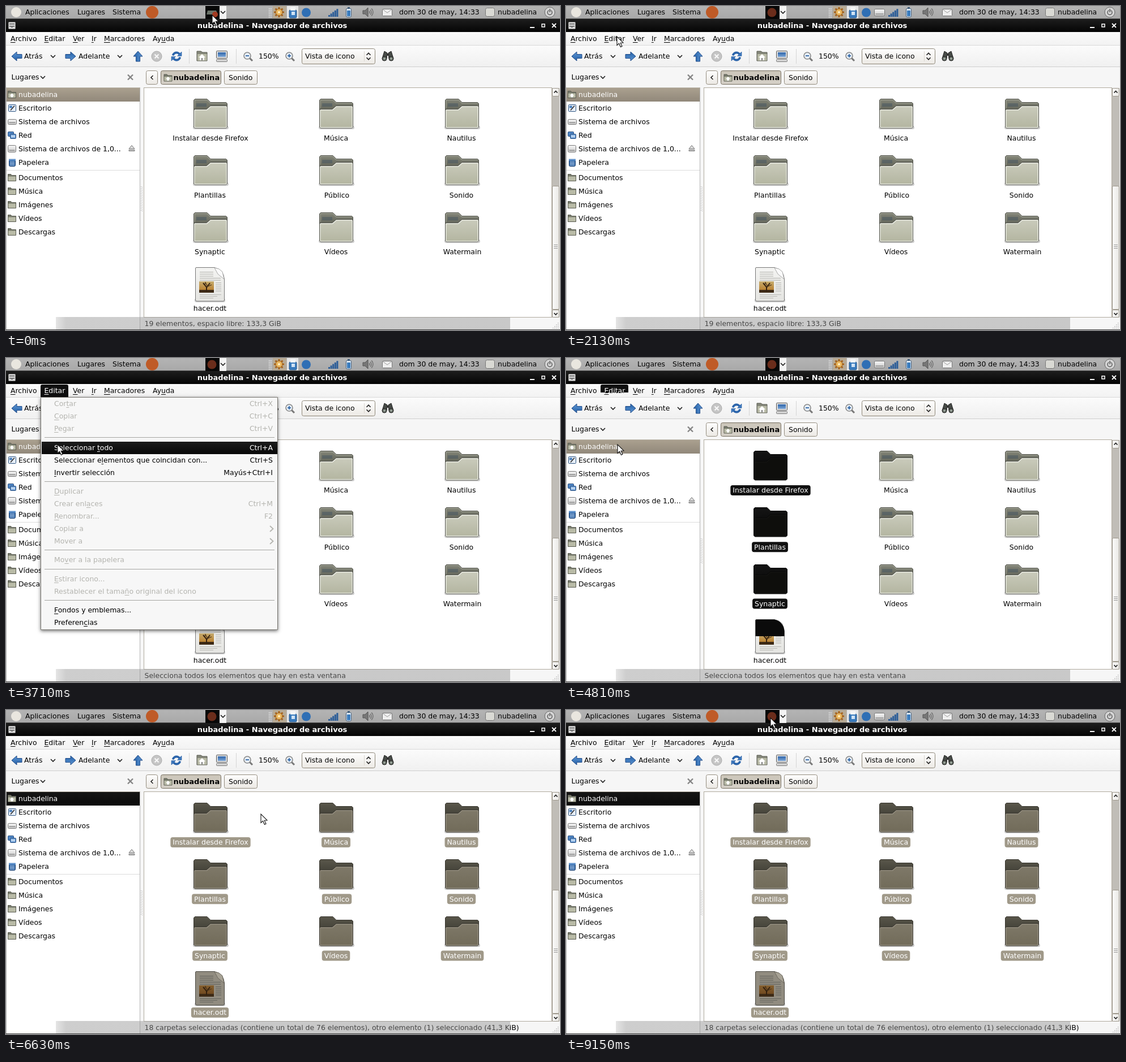
Animation, 978 px wide and 573 px high, one loop 9220 ms. Source, as an HTML page with a canvas:

```html
<!DOCTYPE html>
<html lang="es">
<head>
<meta charset="utf-8">
<title>Navegador de archivos</title>
<style>
html, body { margin: 0; width: 100%; height: 100%; overflow: hidden; background: #f6f6f6; }
canvas { display: block; }
</style>
</head>
<body>
<canvas id="stage" width="978" height="573"></canvas>
<script>
const ctx = document.getElementById('stage').getContext('2d');
const LOOP = 9220, USER = 'nubadelina';
const FONT = '12.45px "DejaVu Sans", sans-serif', BOLD = 'bold 13px "DejaVu Sans", sans-serif';

// Pointer stops: time, x, y
const PATH = [[0, 364, 16], [180, 364, 16], [500, 345, 70], [800, 275, 115], [1110, 207, 118],
  [1450, 130, 95], [1810, 90, 54], [2780, 90, 54], [3060, 88, 102], [3400, 91, 138], [3710, 91, 153],
  [4810, 91, 153], [5090, 122, 157], [5360, 182, 166], [5750, 295, 222], [6050, 380, 214],
  [6390, 450, 184], [7630, 450, 184], [8100, 408, 110], [8570, 363, 29], [8790, 361, 14], [9220, 361, 14]];
// The drive light flips at each of these times
const BLINKS = [180, 620, 1130, 1630, 2130, 2620, 3120, 3620, 4110, 4630, 4810, 5620, 6130, 6630, 7150, 7630, 8150, 8650, 9150];
const OPEN = 2250, CLOSE = 4810, ALL = 4870, BLUR = 4930;

const LOOKS = {
  plain: { edge: '#50514a', back: ['#85877a', '#5c5e53'], front: ['#cacbbc', '#b3b5a0'], shine: '#eeefe8' },
  black: { edge: '#080808', back: ['#151515', '#0c0c0c'], front: ['#0e0e0c', '#0e0e0c'], shine: '#141412' },
  tan: { edge: '#36342d', back: ['#5b584c', '#403f36'], front: ['#7f7969', '#716b59'], shine: '#948e80' }
};

const FILES = [['Instalar desde Firefox', 361, 0, 0], ['Música', 582.5, 1, 0], ['Nautilus', 804, 2, 0],
  ['Plantillas', 360, 0, 1], ['Público', 584, 1, 1], ['Sonido', 804, 2, 1],
  ['Synaptic', 360, 0, 2], ['Vídeos', 582.5, 1, 2], ['Watermain', 805.5, 2, 2]];

const PLACES = [[USER, 156.5], ['Escritorio', 180.5], ['Sistema de archivos', 204.5], ['Red', 228.5],
  ['Sistema de archivos de 1,0...', 252.5], ['Papelera', 276.5], ['Documentos', 303.5], ['Música', 327.5],
  ['Imágenes', 351.5], ['Vídeos', 375.5], ['Descargas', 399.5]];

const MENU = [['Cor_tar', 81, 'Ctrl+X'], ['_Copiar', 103, 'Ctrl+C'], ['_Pegar', 125, 'Ctrl+V'],
  ['Seleccionar _todo', 158.5, 'Ctrl+A', 1], ['Seleccionar e_lementos que coincidan con...', 180.5, 'Ctrl+S', 1],
  ['_Invertir selección', 202.5, 'Mayús+Ctrl+I', 1], ['_Duplicar', 236, ''], ['Crear enl_aces', 258, 'Ctrl+M'],
  ['_Renombrar...', 280, 'F2'], ['Copiar a', 302, '>'], ['Mover a', 324, '>'], ['Mo_ver a la papelera', 357, ''],
  ['_Estirar icono...', 390.5, ''], ['Restablecer el tama_ño original del icono', 412.5, ''],
  ['_Fondos y emblemas...', 446, '', 1], ['Preferen_cias', 468, '', 1]];

function vgrad(y0, y1, a, b) {
  const g = ctx.createLinearGradient(0, y0, 0, y1);
  g.addColorStop(0, a); g.addColorStop(1, b);
  return g;
}
function rect(x, y, w, h, fill) { ctx.fillStyle = fill; ctx.fillRect(x, y, w, h); }
function box(x, y, w, h, r, fill, stroke) {
  ctx.beginPath(); ctx.roundRect(x, y, w, h, r);
  paint(fill, stroke);
}
function paint(fill, stroke, width = 1) {
  if (fill) { ctx.fillStyle = fill; ctx.fill(); }
  if (stroke) { ctx.strokeStyle = stroke; ctx.lineWidth = width; ctx.stroke(); }
}
function disc(x, y, r, fill, stroke, width) {
  ctx.beginPath(); ctx.arc(x, y, r, 0, 7); paint(fill, stroke, width);
}
function poly(pts, fill, stroke, width) {
  ctx.beginPath();
  for (let i = 0; i < pts.length; i += 2) ctx.lineTo(pts[i], pts[i + 1]);
  ctx.closePath(); paint(fill, stroke, width);
}
function line(pts, color, width = 1) {
  ctx.beginPath();
  for (let i = 0; i < pts.length; i += 2) ctx.lineTo(pts[i], pts[i + 1]);
  paint(null, color, width);
}
// Centred on y; an underscore marks the mnemonic letter
function text(str, x, y, color = '#000', align = 'left', font = FONT) {
  const at = str.indexOf('_'), s = str.replace('_', '');
  ctx.font = font; ctx.fillStyle = color; ctx.textAlign = align;
  ctx.fillText(s, x, Math.round(y + 4.4));
  if (at >= 0) {
    const x0 = x + ctx.measureText(s.slice(0, at)).width;
    ctx.fillRect(x0, Math.round(y + 6), ctx.measureText(s[at]).width, 1);
  }
}
function chevron(x, y, color = '#222', dx = 4, dy = 4) {
  line([x - dx, y - dy / 2, x, y + dy / 2, x + dx, y - dy / 2], color, 1.7);
}
function at(x, y, turn, draw) {
  ctx.save(); ctx.translate(x, y); ctx.rotate(turn); draw(); ctx.restore();
}
function arrow(x, y, turn) {
  at(x, y, turn, () => poly([-9, 0, 0, -8, 0, -3.5, 9, -3.5, 9, 3.5, 0, 3.5, 0, 8], vgrad(-8, 8, '#5c95d4', '#2561a6'), '#204a87'));
}

function folder(x, y, look) {
  at(x, y, 0, () => {
    if (look !== LOOKS.black) box(-1, 49, 63, 6, 3, 'rgba(0,0,0,.2)');
    poly([.5, 3.5, 2.5, 1.5, 24, 1.5, 30, 7.5, 57.5, 7.5, 59.5, 9.5, 59.5, 50, .5, 50], vgrad(0, 26, ...look.back), look.edge);
    if (look === LOOKS.plain) {
      line([2, 18, 2, 4, 3, 3, 23.5, 3, 29.5, 9, 58, 9], '#a5a799');
      rect(5, 9, 18, 6, 'rgba(58,78,96,.4)');
    }
    poly([.5, 21, 2.5, 19.5, 23, 19.5, 30, 13.5, 57.5, 13.5, 59.5, 15, 59.5, 51, 57.5, 53, 2.5, 53, .5, 51], vgrad(13, 53, ...look.front), look.edge);
    poly([1.8, 21.5, 3, 20.8, 23.6, 20.8, 30.5, 14.9, 57, 14.9, 58.2, 15.6, 58.2, 51, 57, 51.8, 3, 51.8, 1.8, 51], null, look.shine, 1.2);
  });
}
function sheet(x, y, sel, half) {
  at(x, y, 0, () => {
    const shape = new Path2D('M2 .5H34Q50 4 51.5 21V58Q51.5 60 49 60H3Q.5 60 .5 58V2Q.5 .5 2 .5Z');
    box(-1, 55, 54, 7, 3, 'rgba(0,0,0,.2)');
    ctx.fillStyle = sel ? '#918c80' : vgrad(0, 60, '#f4f4f2', '#e4e4e1'); ctx.fill(shape);
    const ink = sel ? '#66665f' : '#b9b9b5';
    for (let i = 0; i < 5; i++) rect(8, 8 + i * 3.6, i < 3 ? 24 : 37, 1.2, ink);
    for (let i = 0; i < 5; i++) rect(36, 27 + i * 3.6, 10, 1.2, ink);
    for (let i = 0; i < 3; i++) rect(8, 48 + i * 3, 38 - i * 7, 1, ink);
    rect(7, 25, 26, 20, vgrad(25, 45, sel ? '#85602f' : '#c7ac6e', sel ? '#6b431c' : '#b5741f'));
    rect(7, 40, 26, 5, '#3d2a16');
    line([20, 42, 20, 35, 14, 28], '#33200f', 2); line([20, 36, 26, 28], '#33200f', 2);
    line([17, 32, 18, 27, 22, 34, 29, 31], '#4b341b', 1.2);
    ctx.strokeStyle = sel ? '#4b4942' : '#777'; ctx.lineWidth = 1; ctx.stroke(shape);
    poly([34, 1, 40, 12, 51, 21, 48, 8, 42, 3], sel ? '#a7a295' : '#fafafa', sel ? '#6d695f' : '#aaa');
    if (half) { ctx.clip(shape); rect(-1, 0, 54, 30, '#0b0b0b'); }
  });
}
function miniFolder(x, y, home) {
  poly([x, y, x + 5, y, x + 7, y + 2, x + 14, y + 2, x + 14, y + 12, x, y + 12], '#777a6c', '#5a5c52');
  rect(x + .5, y + 4, 13, 7.5, '#b9bba7');
  if (home) { poly([x + 7, y + 4, x + 11, y + 8, x + 3, y + 8], '#fff'); rect(x + 5, y + 7, 4, 4, '#fff'); }
}
function drive(x, y, w, h) {
  box(x, y, w, h, 2, vgrad(y, y + h, '#f7f7f7', '#c9c9c9'), '#777');
  rect(x + 2, y + h - 4, w - 4, 1.5, '#8c8c8c');
}

function panel(t) {
  rect(0, 0, 978, 23, vgrad(0, 23, '#b4b4b4', '#a8a8a8'));
  rect(0, 22, 978, 1, '#4f4f4f');
  disc(18, 11, 9, '#e9e6df');
  text('Aplicaciones', 34, 10.5); text('Lugares', 126, 10.5); text('Sistema', 188, 10.5);
  disc(258, 11, 11, '#bf5b27');
  rect(352, 0, 25, 23, '#070707');
  if (t < 180) {
    poly([356, 8, 371, 8, 374, 15, 354, 15], '#687066');
    disc(369, 15, 5, '#a33a20');
  } else disc(363.5, 11.5, 8, '#6b2d1b');
  rect(377, 0, 12, 23, '#f4f4f4'); chevron(383, 11);
  for (let i = 0; i < 12; i++) rect(464 + i % 2 * 3, 4 + (i >> 1) * 3, 1.5, 1.5, '#eee');
  rect(471, 0, 24, 22, '#b7aa95');
  for (let i = 0; i < 8; i++) at(482, 11, i * Math.PI / 4, () => rect(-1.5, -9, 3, 5, '#a7641d'));
  disc(482, 11, 6, '#e9b65d', '#96591c'); disc(482, 11, 2, '#fff0c7');
  rect(496, 0, 20, 22, '#e7e7e7');
  box(500, 7, 13, 14, 2, '#397bbd', '#245487'); rect(502, 2, 9, 6, '#f5f5f5'); rect(504, 10, 6, 6, '#cfe2f4');
  disc(530, 11.5, 8, '#2f6fb5');
  if (BLINKS.filter(b => b <= t).length % 2) drive(544.5, 5.5, 18, 12);
  for (let i = 0; i < 5; i++) rect(569 + i * 3.6, 16 - i * 2.7, 3, 3 + i * 2.7, '#2c5d98');
  box(600.5, 4.5, 9, 15, 2, '#dce8f3', '#3d5876'); rect(603, 2, 4, 2, '#3d5876'); rect(602, 8, 6, 10, '#397bbd');
  poly([630, 8, 634, 8, 639, 3, 639, 19, 634, 14, 630, 14], '#777', '#555');
  for (let i = 0; i < 3; i++) { ctx.beginPath(); ctx.arc(639, 11, 3 + i * 3, -.8, .8); paint(null, '#666', 1.2); }
  box(664.5, 5.5, 17, 12, 1, '#efefef', '#777'); line([665, 6, 673, 12, 681, 6], '#999');
  text('dom 30 de may, 14:33', 694, 10.5);
  box(846.5, 3.5, 16, 15, 3, '#d9d9d4', '#777');
  text(USER, 868, 10.5);
  disc(960, 11, 9, '#d4d4d4', '#666'); disc(960, 11.5, 4, null, '#555', 1.4); rect(958.5, 5, 3, 6, '#d4d4d4'); rect(959.4, 5, 1.4, 6, '#555');
}

function frameTop(t) {
  rect(0, 23, 978, 23, vgrad(23, 46, '#1d1d1d', '#050505'));
  box(4.5, 28.5, 12, 12, 1, '#ddd', '#888'); rect(6, 31, 9, 1.5, '#555'); rect(6, 35, 9, 1.5, '#555'); rect(9, 37, 3, 1, '#555');
  text(USER + ' - Navegador de archivos', 470, 34.5, '#fff', 'center', BOLD);
  rect(925, 37, 8, 2, '#fff');
  ctx.strokeStyle = '#fff'; ctx.lineWidth = 1.5; ctx.strokeRect(946, 32, 5, 5);
  line([964, 31, 971, 38], '#fff', 1.8); line([971, 31, 964, 38], '#fff', 1.8);
  rect(0, 46, 978, 24, vgrad(46, 70, '#fafafa', '#f2f2f2'));
  rect(0, 69, 978, 1, '#d9d9d9');
  [['_Archivo', 8], ['_Ver', 118], ['_Ir', 151], ['_Marcadores', 173], ['Ay_uda', 259]].forEach(([s, x]) => text(s, x, 57.5));
  const open = t >= OPEN && t < CLOSE, closing = t >= CLOSE && t < ALL;
  if (open || closing) box(61, 47, 49, open ? 22 : 14, [3, 3, 0, 0], '#0e0e0e');
  if (closing) {
    ctx.save(); ctx.beginPath(); ctx.rect(61, 47, 49, 14); ctx.clip();
    text('_Editar', 67.5, 57.5, '#fff'); ctx.restore();
    ctx.save(); ctx.beginPath(); ctx.rect(61, 61, 49, 8); ctx.clip();
    text('_Editar', 67.5, 57.5); ctx.restore();
  } else text('_Editar', 67.5, 57.5, open ? '#fff' : '#000');
}

function lens(x, plus) {
  line([x + 3, 92, x + 8, 97], '#777', 3);
  disc(x - 1, 88, 6, '#e7eef5', '#888', 1.6);
  rect(x - 4, 87.2, 6, 1.8, '#2f66a8');
  if (plus) rect(x - 1.9, 85, 1.8, 6, '#2f66a8');
}
function toolbar() {
  rect(0, 70, 978, 38, vgrad(70, 108, '#fbfbfb', '#f0f0f0'));
  rect(0, 107, 978, 1, '#cfcfcf');
  rect(0, 108, 978, 37, '#f6f6f6');
  arrow(19, 89, 0); text('Atrás', 32, 89); chevron(83, 89);
  arrow(114, 89, Math.PI); text('Adelante', 128, 89); chevron(201, 89);
  arrow(233, 89, Math.PI / 2);
  disc(266, 89, 9, '#c5c5c5', '#aaa');
  line([262.5, 85.5, 269.5, 92.5], '#f7f7f7', 2.2); line([269.5, 85.5, 262.5, 92.5], '#f7f7f7', 2.2);
  for (const k of [0, Math.PI]) at(301, 89, k, () => {
    ctx.beginPath(); ctx.arc(0, 0, 6.5, -2.9, -.5); paint(null, '#2c65ab', 3.8);
    poly([9, -8, 9, -.5, 1.5, -.5], '#3d78bd', '#2459a0', .6);
  });
  rect(323, 76, 1, 26, '#d5d5d5'); rect(406, 76, 1, 26, '#d5d5d5');
  poly([337, 80, 344, 80, 347, 82, 355, 82, 355, 97, 337, 97], '#85877a', '#595b51');
  rect(338, 85, 16.5, 11.5, '#b9bba7');
  poly([346, 85, 352, 91, 340, 91], '#fff'); rect(342, 90, 8, 6, '#fff'); rect(345, 92, 2, 4, '#777');
  box(371.5, 79.5, 19, 13, 1, '#e0e0e0', '#555'); rect(374, 82, 14, 8, vgrad(82, 90, '#2f65aa', '#7ba5d6'));
  box(371.5, 94.5, 19, 4, 1, '#d8d8d8', '#777');
  lens(427); text('150%', 446, 89); lens(501, true);
  box(522.5, 75.5, 129, 27, 3, vgrad(75, 103, '#fefefe', '#ece9e4'), '#8e8778');
  text('Vista de icono', 528, 89);
  rect(632, 80, 1, 18, '#d9d5ce');
  chevron(640, 85, '#222', 3.5, -3.5); chevron(640, 93, '#222', 3.5, 3.5);
  for (const s of [-1, 1]) {
    poly([674 + s, 83, 674 + s * 6, 80, 674 + s * 10, 93, 674 + s * 2, 93], '#484c48', '#222');
    disc(674 + s * 6, 93, 4, '#5f665f', '#222'); disc(674 + s * 6, 93, 1.6, '#aeb9b0');
  }
  rect(672, 84, 4, 4, '#333');

  text('Lugares', 9.5, 126); chevron(65, 126);
  line([215, 121.5, 224, 130.5], '#858585', 2.4); line([224, 121.5, 215, 130.5], '#858585', 2.4);
  const face = vgrad(114, 139, '#fefefe', '#ebe8e3');
  box(247.5, 114.5, 20, 24, 3, face, '#948d7f');
  line([259.5, 123, 256, 126.5, 259.5, 130], '#222', 1.6);
  box(273.5, 114.5, 106, 24, 3, vgrad(114, 139, '#cac4b8', '#d6d1c8'), '#776f60');
  miniFolder(279, 121, true);
  text(USER, 295.5, 127, '#000', 'left', BOLD);
  box(385.5, 114.5, 58, 24, 3, face, '#948d7f');
  text('Sonido', 393, 126.5);
}

function placeIcon(i, y) {
  if (i === 0 || i > 5) return miniFolder(3.5, y - 6, i === 0);
  if (i === 1) {
    box(4.5, y - 6, 13, 12, 1, '#e6eef8', '#2b527f');
    rect(6, y - 4, 5, 4, '#4c82c0'); line([8, y + 4, 15, y - 4], '#333', 1.6);
  } else if (i === 2) drive(3.5, y - 4, 15, 9);
  else if (i === 3) {
    box(3.5, y - 6, 10, 8, 1, '#4f86c6', '#294d7a'); box(7.5, y - 2, 10, 8, 1, '#5d92cf', '#294d7a');
    rect(9, y, 7, 4, '#b9d3ee');
  } else if (i === 4) drive(3.5, y - 6, 14, 12);
  else {
    box(5.5, y - 5, 11, 12, 2, '#3469a8', '#1f4270'); rect(5, y - 6, 12, 3, '#5f91cb');
    for (let k = 0; k < 3; k++) rect(7, y - 1 + k * 2.6, 8, 1, '#bcd2eb');
  }
}
function sidebar(t) {
  rect(0, 145, 237, 428, '#fff');
  rect(0, 144, 237, 1, '#bdb8ad'); rect(236, 145, 1, 427, '#b4b4b4'); rect(0, 145, 1, 427, '#b4b4b4');
  rect(1, 145, 235, 24, t >= BLUR ? vgrad(145, 169, '#151515', '#0a0a0a') : vgrad(145, 169, '#aaa08f', '#91887a'));
  PLACES.forEach(([s, y], i) => { placeIcon(i, y); text(s, 22, y, i ? '#000' : '#fff'); });
  poly([222, 246.5, 227, 252.5, 217, 252.5], '#ddd', '#777'); box(217, 254.5, 10, 2, 0, '#ddd', '#777');
  rect(1, 290, 235, 1, '#dcdcdc');
  for (let i = 0; i < 15; i++) { rect(238, 319 + i * 3, 1, 1, '#aaa'); rect(240, 320 + i * 3, 1, 1, '#aaa'); }
}

function label(s, x, y, fill) {
  if (fill) {
    ctx.font = FONT;
    const w = ctx.measureText(s).width + 8;
    box(x - w / 2, y - 9, w, 18, 4, fill);
  }
  text(s, x, y, fill ? '#fff' : '#000', 'center');
}
function files(t) {
  rect(243, 145, 720, 406, '#fff');
  ctx.strokeStyle = '#b0aa9e'; ctx.lineWidth = 1; ctx.strokeRect(243.5, 144.5, 720, 406);
  const tan = t >= BLUR, pill = tan ? '#a09989' : '#111';
  FILES.forEach(([s, x, col, row]) => {
    const sel = t >= ALL || t >= CLOSE && col === 0;
    folder(331 + col * 222, Math.round(163 + row * 100.3), LOOKS[sel ? tan ? 'tan' : 'black' : 'plain']);
    label(s, x, 234 + row * 100.3, sel && pill);
  });
  sheet(334, 462, tan, t >= CLOSE && !tan);
  label('hacer.odt', 360, 535, t >= ALL && pill);

  rect(964, 145, 13, 406, '#c0bdb7');
  const face = ctx.createLinearGradient(964, 0, 977, 0);
  face.addColorStop(0, '#fdfdfd'); face.addColorStop(1, '#e7e5e1');
  [[145.5, 14], [318.5, 218], [537.5, 13]].forEach(([y, h]) => box(964.5, y, 12, h, 2, face, '#9d978b'));
  chevron(970.5, 152, '#222', 3, -3); chevron(970.5, 544.5, '#222', 3, 3);
  for (let i = 0; i < 3; i++) rect(967, 422 + i * 3, 7, 1, '#999');
}
function status(t, hover) {
  rect(237, 551, 741, 22, '#f6f6f6');
  const s = t >= ALL ? '18 carpetas seleccionadas (contiene un total de 76 elementos), otro elemento (1) seleccionado (41,3 KiB)'
    : hover || t >= CLOSE ? 'Selecciona todos los elementos que hay en esta ventana' : '19 elementos, espacio libre: 133,3 GiB';
  text(s, 244.5, 561.5);
  for (let i = 0; i < 4; i++) for (let k = 0; k <= i; k++) rect(974 - k * 3, 560 + i * 3, 1.5, 1.5, '#bbb');
  const g = ctx.createLinearGradient(88, 0, 106, 0);
  g.addColorStop(0, 'rgba(150,150,150,.25)'); g.addColorStop(1, 'rgba(150,150,150,.47)');
  rect(88, 550, 802, 23, g);
  rect(0, 572, 978, 1, '#444');
}

function menu(hover) {
  ctx.save();
  ctx.shadowColor = 'rgba(0,0,0,.55)'; ctx.shadowBlur = 6; ctx.shadowOffsetY = 1.5;
  rect(61, 69, 419, 412, '#f7f7f7');
  ctx.restore();
  box(61.5, 69.5, 418, 411, 0, '#f7f7f7', '#77756f');
  if (hover) rect(63, 148, 416, 22, vgrad(148, 170, '#1b1b1b', '#080808'));
  [140, 218, 339, 373, 428].forEach(y => rect(68, y, 406, 1, '#a5a5a2'));
  MENU.forEach(([s, y, key, on], i) => {
    const color = hover && i === 3 ? '#fff' : on ? '#000' : '#b4b4af';
    text(s, 85, y, color);
    if (key === '>') line([466, y - 5, 471.5, y, 466, y + 5], color, 1.8);
    else text(key, 471, y, color, 'right');
  });
}

function pointer(x, y) {
  at(x, y, 0, () => poly([0, 0, 0, 15.5, 3.6, 12.2, 6.4, 18.5, 9, 17.3, 6.2, 11.3, 11, 11], '#fff', '#111', 1.1));
}
function slope(i, k) {
  const a = PATH[i - 1], b = PATH[i], c = PATH[i + 1];
  if (!a || !c) return 0;
  const still = (p, q) => p[1] === q[1] && p[2] === q[2];
  return still(a, b) || still(b, c) ? 0 : (c[k] - a[k]) / (c[0] - a[0]);
}
function place(t) {
  let i = 0;
  while (i < PATH.length - 2 && t >= PATH[i + 1][0]) i++;
  const a = PATH[i], b = PATH[i + 1], d = b[0] - a[0], u = (t - a[0]) / d, v = 1 - u;
  return [1, 2].map(k => a[k] * v * v * (1 + 2 * u) + b[k] * u * u * (3 - 2 * u)
    + d * u * v * (v * slope(i, k) - u * slope(i + 1, k)));
}

function draw(now) {
  const t = now % LOOP, [x, y] = place(t);
  const open = t >= OPEN && t < CLOSE, hover = open && y >= 147;
  ctx.fillStyle = '#f6f6f6'; ctx.fillRect(0, 0, 978, 573);
  panel(t); frameTop(t); toolbar(); sidebar(t); files(t); status(t, hover);
  if (open) menu(hover);
  pointer(Math.round(x), Math.round(y));
}
const start = performance.now();
function tick() {
  draw(performance.now() - start);
  requestAnimationFrame(tick);
}
tick();
</script>
</body>
</html>
```
